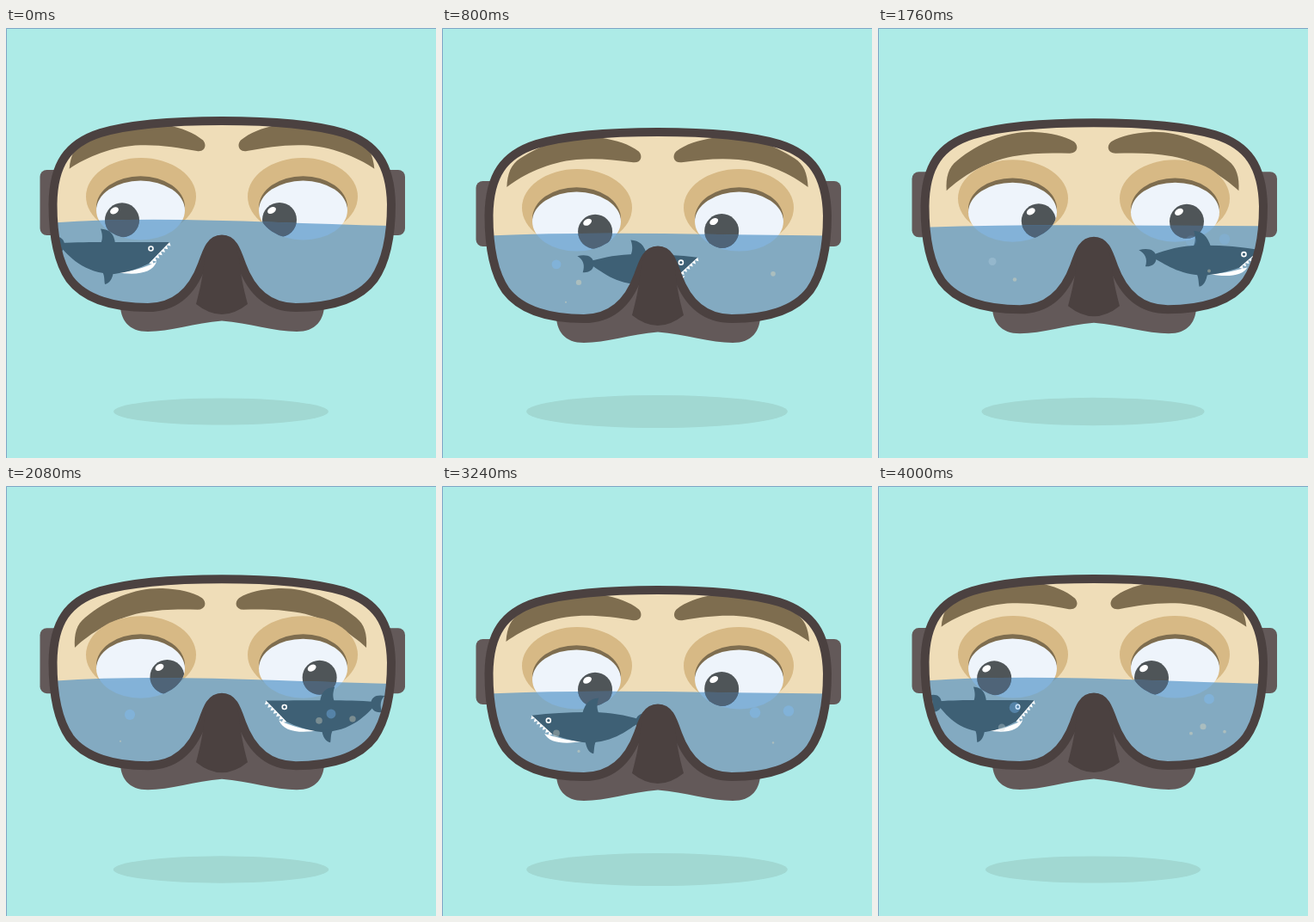
Write an HTML page that moves like this. It is 500x500 px and loops after 4.04 s.

```html
<!DOCTYPE html>
<html lang="en">
<head>
<meta charset="utf-8">
<title>Diving mask</title>
<style>
html, body { margin: 0; width: 100%; height: 100%; overflow: hidden; background: #adebe7; }
svg { display: block; width: 100vw; height: 100vh; }
</style>
</head>
<body>
<svg viewBox="0 0 500 500">
  <defs>
    <path id="lens" d="M251 108C304 108 358 112 392 122C430 134 447 158 448 205C448 240 443 270 428 292C410 316 375 325 337 325C307 325 286 308 274 275C268 258 264 245.5 251 245.5C238 245.5 234 258 228 275C216 308 195 325 165 325C127 325 92 316 74 292C59 270 54.5 240 54.5 205C55 158 72 134 110 122C144 112 198 108 251 108Z"/>
    <path id="brow" d="M80 188C79 172 82 161 92 153C118 131 152 118 182 119C202 120 216 123 228 130C234 135 232 143.5 223 143.5C200 143 180 143 157 147.5C125 154 98 171 80 188Z"/>
    <ellipse id="white" cx="156.5" cy="212" rx="51.5" ry="34.5"/>
    <g id="socket">
      <ellipse cx="157" cy="196" rx="64" ry="45" fill="#d7b985"/>
      <ellipse cx="156.5" cy="208.5" rx="51.5" ry="36.3" fill="#7e6d4f"/>
      <use href="#white" fill="#eef4fb"/>
    </g>
    <g id="shine"><ellipse cx="-9" cy="-11" rx="5.3" ry="3.6" transform="rotate(-30 -9 -11)" fill="#fff"/></g>
    <g id="pupils" clip-path="url(#inEyes)">
      <circle class="left" r="20"/>
      <circle class="right" r="20"/>
    </g>
    <clipPath id="inEyes">
      <use href="#white"/>
      <use href="#white" transform="translate(189 0)"/>
    </clipPath>
    <clipPath id="inLens"><use href="#lens"/></clipPath>
    <clipPath id="inWater"><path class="water"/></clipPath>
  </defs>
  <rect width="500" height="500" fill="#adebe7"/>
  <path d="M.5 500V.5H500" fill="none" stroke="#7fa5c6"/>
  <ellipse id="shadow" cx="250" cy="446" fill="#a1d8d2"/>
  <g id="mask">
    <g fill="#635959">
      <rect x="39.5" y="165" width="30" height="76" rx="8"/>
      <rect x="434" y="165" width="30" height="76" rx="8"/>
      <path d="M133 318C132 340 143 353 165 353C190 353 220 343 251 340.5C282 343 313 353 338 353C360 353 371 340 370 318L251 262Z"/>
    </g>
    <g clip-path="url(#inLens)">
      <use href="#lens" fill="#efddb8"/>
      <g fill="#7e6d4f">
        <use href="#brow" class="brow"/>
        <g id="rightBrow"><use href="#brow" class="brow"/></g>
      </g>
      <use href="#socket"/>
      <use href="#socket" transform="matrix(-1 0 0 1 502 0)"/>
      <use href="#pupils" fill="#4f5558"/>
      <use href="#shine" class="left"/>
      <use href="#shine" class="right"/>
      <path class="water" fill="#4b90c6" fill-opacity=".65"/>
      <g clip-path="url(#inWater)"><use href="#pupils" fill="#4f6478"/></g>
      <g id="shark" fill="#3e6075">
        <path id="jaw" fill="#fff"/>
        <path id="teeth" fill="#fff"/>
        <path id="tail"/>
        <path id="body"/>
        <path id="fins"/>
        <circle id="eye" cx="50.5" r="2.5" fill="none" stroke="#fff" stroke-width="1.6"/>
      </g>
      <g id="bubbles"></g>
    </g>
    <use href="#lens" fill="none" stroke="#4b4140" stroke-width="10"/>
    <path fill="#4b4140" d="M251 241C238 241 234 252 231 268C229 288 226 302 221 321Q251 345 281 321C276 302 273 288 271 268C268 252 264 241 251 241Z"/>
  </g>
</svg>
<script>
const LOOP = 4040, HALF = LOOP / 2, SWIM = 1770;
const $ = id => document.getElementById(id);
const all = (selector, name, value) =>
  document.querySelectorAll(selector).forEach(el => el.setAttribute(name, value));
const clamp = u => Math.min(1, Math.max(0, u));
const ease = u => (1 - Math.cos(Math.PI * clamp(u))) / 2;
const mix = (a, b, u) => a + (b - a) * u;

// x, lowest y, delay expressed as rise distance
const BUBBLES = [
  [133, 299, 6.8], [144, 308, 41.8], [159, 302, 24.8],
  [364, 297, 59.8], [378, 302, 46.9], [385, 289, 27.8], [403, 294, 60.8]
].map(([x, base, delay]) => {
  const el = document.createElementNS('http://www.w3.org/2000/svg', 'circle');
  el.setAttribute('cx', x);
  $('bubbles').append(el);
  return { el, base, delay };
});

function drawEyes(t) {
  const m = t < HALF ? t : LOOP - t;
  const a = ease(m / 1010), b = ease((m - 1010) / 1010);
  const place = (x, y) => `translate(${x} ${y})`;
  all('.left', 'transform', place(135 + 48 * a + 4.5 * b, 223.3 + .5 * a - 2 * b));
  all('.right', 'transform', place(318 + 8 * a + 39 * b, 223 - .5 * b));
}

function drawBrows(t) {
  const lowered = t < HALF ? ease(t / HALF) : 1 - ease((t - HALF) / 1680);
  all('.brow', 'transform', `rotate(${9.4 * (1 - lowered)} 225 137)`);
  $('rightBrow').setAttribute('transform', `matrix(-1 0 0 1 ${502 - 3 * lowered} 0)`);
}

function drawWater(c) {
  all('.water', 'd', `M50 ${229.5 - 2.8 * c}C182 ${224.6 - 7.6 * c} 318 ${228 - .5 * c} 452 ${228 + 2 * c}V340H50Z`);
}

function drawShark(t, bend) {
  const leg = t % HALF, back = t >= HALF;
  const swim = ease(leg / SWIM);
  const x = mix(118, 375, back ? 1 - swim : swim);
  const turn = 1 - 2 * ease((leg - SWIM) / (HALF - SWIM));
  $('shark').setAttribute('transform', `translate(${x} 250) scale(${back ? -turn : turn} 1)`);

  // a point for the straight pose and one for the arched pose
  const p = (x0, y0, x1, y1) => `${mix(x0, x1, bend).toFixed(2)} ${mix(y0, y1, bend).toFixed(2)} `;
  const set = (id, d) => $(id).setAttribute('d', d);
  set('body', 'M' + p(72, -1, 66, 12) + 'C' + p(45, -1, 44, 4) + p(25, -1, 18, 1) + p(0, -1, -4, 2) +
    'C' + p(-20, -1, -26, 2) + p(-36, -1, -41, 12) + p(-55, 0, -56, 22) +
    'L' + p(-55, 4, -55, 26) + 'C' + p(-46, 14, -38, 27) + p(-28, 36, -26, 34) + p(8, 36, 4, 35) +
    'C' + p(24, 34, 20, 33) + p(38, 29, 30, 32) + p(48, 24, 42, 29) + 'Z');
  set('tail', 'M' + p(-50, 2, -53, 26) + 'C' + p(-50, -6, -53, 17) + p(-57, -9, -64, 14) + p(-66, -7, -77, 18) +
    'C' + p(-61, -3, -68, 21) + p(-60, 4, -62, 27) + p(-63, 12, -65, 37) +
    'C' + p(-55, 13, -57, 37) + p(-50, 9, -52, 33) + p(-50, 2, -53, 26) + 'Z');
  set('fins', 'M-8 -16.5C2 -16 8 -11 ' + p(9, 1, 15, 4) + 'L' + p(-8, 1, -9, 4) + 'C-5 -5 -6 -11 -8 -16.5Z' +
    'M' + p(-6, 33, -3, 33) + 'L' + p(7, 33, 9, 33) + 'C' + p(6, 42, 8, 42) + p(2, 47, 5, 48) + p(-3, 48, 0, 49) +
    'C' + p(-4, 43, -1, 43) + p(-3, 39, -1, 39) + p(-6, 33, -3, 33) + 'Z');
  set('jaw', 'M' + p(10, 34, 8, 33) + 'C' + p(28, 34, 25, 34) + p(44, 28, 40, 30) + p(57, 22, 52, 30) +
    'C' + p(52, 35, 46, 37) + p(34, 38, 28, 38) + p(10, 34, 8, 33) + 'Z');
  let teeth = 'M' + p(72, -1, 66, 12);
  const count = 7;
  for (let i = 0; i < count; i++) {
    const u = (i + .5) / count, v = (i + 1) / count;
    teeth += 'L' + p(72 - 23 * u + 3.2, 25 * u + 1.8, 66 - 24 * u + 2.2, 12 + 17 * u + 3);
    teeth += 'L' + p(72 - 23 * v, -1 + 25 * v, 66 - 24 * v, 12 + 17 * v);
  }
  set('teeth', teeth + 'L' + p(46, 20, 42, 24) + 'Z');
  $('eye').setAttribute('cy', mix(6.5, 15, bend));
}

function drawBubbles(t) {
  for (const { el, base, delay } of BUBBLES) {
    const travel = t * 75 / 505 - delay, rise = travel % 75;
    const blue = clamp((rise - 22) / 14);
    el.setAttribute('cy', base - rise);
    el.setAttribute('r', travel < 0 ? 0 : Math.min(6.3, .8 + rise / 8));
    el.setAttribute('fill', `rgb(${mix(239, 126, blue)} ${mix(221, 189, blue)} ${mix(184, 255, blue)})`);
    el.setAttribute('fill-opacity', .37 * clamp((54 - rise) / 6));
  }
}

function draw(t) {
  const drop = (1 - Math.cos(2 * Math.PI * t / HALF)) / 2;
  const sway = Math.cos(2 * Math.PI * t / 1010);
  $('mask').setAttribute('transform', `translate(0 ${14.5 * drop})`);
  $('shadow').setAttribute('rx', 125 + 30 * drop);
  $('shadow').setAttribute('ry', 15.6 + 3.8 * drop);
  drawEyes(t);
  drawBrows(t);
  drawWater(sway);
  drawShark(t, (1 - sway) / 2);
  drawBubbles(t);
}

const start = performance.now();
function tick() {
  draw((performance.now() - start) % LOOP);
  requestAnimationFrame(tick);
}
tick();
</script>
</body>
</html>
```
